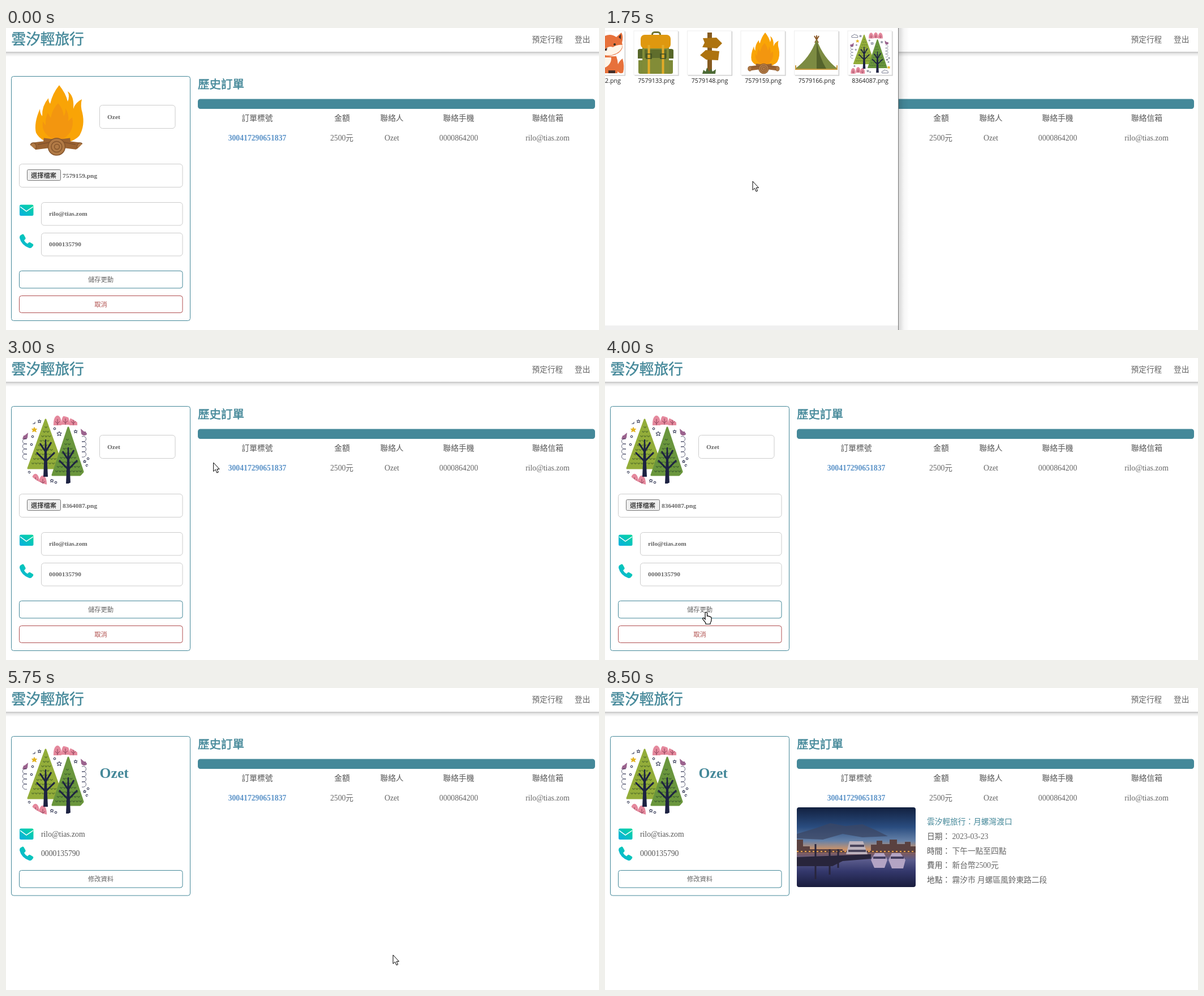
Animation of 1048 by 534 pixels, one loop 9500 ms. Source, as an HTML page:

```html
<!DOCTYPE html>
<html lang="zh-Hant">
<head>
<meta charset="utf-8">
<style>
html, body { margin: 0; width: 100%; height: 100%; overflow: hidden; background: #fff; }
svg { display: block; }
text { font: 13.7px "Liberation Serif", "Noto Sans CJK TC", "Noto Sans CJK JP", serif; fill: #666; }
.mid { text-anchor: middle; }
.teal { fill: #448899; }
.head { stroke: #448899; stroke-width: .5; }
.med { font-weight: 500; }
.dark { fill: #555; }
.input { font-size: 11.4px; font-weight: bold; }
.btn { font-size: 11.3px; text-anchor: middle; }
.file { font: 10.7px "Open Sans", "Noto Sans", sans-serif; fill: #222; text-anchor: middle; }
.box { fill: #fff; stroke: #ccc; }
.frame { fill: #fff; stroke: #448899; }
#link { font-weight: bold; fill: #5b93c8; }
#link.hover { fill: #9fcade; }
</style>
</head>
<body>
<svg width="1048" height="534" viewBox="0 0 1048 534">
<defs>
  <linearGradient id="headShade" x2="0" y2="1"><stop stop-color="#000" stop-opacity=".24"/><stop offset=".4" stop-color="#000" stop-opacity=".09"/><stop offset="1" stop-color="#000" stop-opacity="0"/></linearGradient>
  <linearGradient id="sideShade"><stop stop-color="#000" stop-opacity=".16"/><stop offset=".5" stop-color="#000" stop-opacity=".04"/><stop offset="1" stop-color="#000" stop-opacity="0"/></linearGradient>
  <linearGradient id="mint" x1="0" y1="1" x2="1" y2="0"><stop stop-color="#06aee2"/><stop offset="1" stop-color="#08d79c"/></linearGradient>
  <linearGradient id="dusk" x2="0" y2="1">
    <stop stop-color="#12203f"/><stop offset=".25" stop-color="#2a4d80"/><stop offset=".42" stop-color="#6581a8"/>
    <stop offset=".53" stop-color="#cf9468"/><stop offset=".58" stop-color="#7a5a62"/><stop offset=".66" stop-color="#5a5b8c"/><stop offset=".8" stop-color="#34386c"/><stop offset="1" stop-color="#191c3d"/>
  </linearGradient>
  <clipPath id="round"><circle cx="88" cy="163.5" r="62.5"/></clipPath>
  <clipPath id="photoClip"><rect x="339" y="211" width="210" height="141" rx="4"/></clipPath>
  <g id="fire">
    <path fill="#f9a406" d="M94 101Q106 116 109 130Q113 121 109 112Q121 120 119 143Q122 132 134 126Q131 138 135 150Q140 172 130 190Q120 202 95 204Q62 204 53 185Q49 168 60 143Q60 151 64 156Q63 138 75 124Q75 130 78 134Q82 116 94 101Z"/>
    <path fill="#f3960f" d="M92 133Q101 143 102 156Q106 150 105 142Q112 152 110 165Q114 160 117 158Q123 188 92 200Q61 190 65 165Q68 170 70 172Q69 160 74 150Q77 156 79 159Q82 143 92 133Z"/>
    <path stroke="#9b6332" stroke-width="13" d="M49 209L114 201M130 209L66 201"/>
    <path stroke="#80502a" stroke-width="1.500" d="M56 206L78 202M123 206L102 202"/>
    <g fill="#b17a45" stroke="#85552c" stroke-width="1.500">
      <ellipse cx="48" cy="210" rx="5.500" ry="7"/><ellipse cx="131" cy="210" rx="5.500" ry="7"/>
      <circle cx="89.500" cy="210" r="15"/><circle cx="89.500" cy="210" r="9.500"/><circle cx="90" cy="210" r="4.500"/>
    </g>
  </g>
  <g id="trees"></g>
  <g id="mail">
    <rect x="24" y="312.500" width="24.500" height="19.500" rx="2.500" fill="url(#mint)"/>
    <path d="M25 316L36 324L48 316" fill="none" stroke="#fff" stroke-width="1.500"/>
  </g>
  <path id="phone" fill="url(#mint)" d="M25 367L29 364.500Q30.500 364 31.500 365.500L34.500 371Q35 372.500 34 373.500L32 375.500Q34 379.500 38 381.500L40 379.500Q41 378.500 42.500 379L47.500 382Q49 383 48 385L45.500 388Q44 389.500 41 389Q27 384 24 371Q24 368.500 25 367Z"/>
</defs>

<!-- page -->
<rect width="1048" height="534" fill="#fff"/>
<rect y="42" width="1048" height="9" fill="url(#headShade)"/>
<text x="9.500" y="28.800" class="teal head" style="font-size:25.7px">雲汐輕旅行</text>
<text x="929.500" y="24.800">預定行程</text><text x="1005" y="24.800">登出</text>
<text x="339" y="106.800" class="teal head" style="font-size:20.5px">歷史訂單</text>
<rect x="339" y="125.500" width="702" height="17.500" rx="4.500" fill="#448899"/>
<g class="mid">
  <g class="med">
    <text class="dark" x="444" y="164">訂單標號</text><text class="dark" x="594" y="164">金額</text><text class="dark" x="682" y="164">聯絡人</text>
    <text class="dark" x="800" y="164">聯絡手機</text><text class="dark" x="957.500" y="164">聯絡信箱</text>
  </g>
  <text id="link" x="444" y="199">300417290651837</text><text x="593.500" y="199">2500元</text><text x="682" y="199">Ozet</text>
  <text x="800" y="199">0000864200</text><text x="957" y="199">rilo@tias.zom</text>
</g>

<rect id="panel" class="frame" x="9.500" y="85.500" width="316" rx="4"/>
<g clip-path="url(#round)"><use id="avatar"/></g>
<g id="edit">
  <rect class="box" x="165.500" y="136.500" width="133.500" height="41" rx="5"/><text class="input" x="179" y="161">Ozet</text>
  <rect class="box" x="23.500" y="240.500" width="288.500" height="41" rx="5"/>
  <rect x="37.500" y="250.500" width="59" height="19" rx="2" fill="#efefef" stroke="#767676"/>
  <text class="btn" x="66.500" y="264.500" style="fill:#000">選擇檔案</text><text id="fileName" class="input" x="100" y="265"></text>
  <use href="#mail"/><rect class="box" x="62.500" y="308.500" width="249.500" height="40.500" rx="5"/><text class="input" x="76" y="332">rilo@tias.zom</text>
  <use href="#phone"/><rect class="box" x="62.500" y="362.500" width="249.500" height="40.500" rx="5"/><text class="input" x="76" y="386">0000135790</text>
  <rect class="frame" x="23.500" y="429.500" width="288.500" height="30.500" rx="4"/><text class="btn" x="167.500" y="449.300">儲存更動</text>
  <rect class="frame" x="23.500" y="473.500" width="288.500" height="30" rx="4" style="stroke:#b04e50"/><text class="btn" x="167.500" y="493" style="fill:#b0504e">取消</text>
</g>
<g id="view">
  <text class="teal" x="165.500" y="159.300" style="font-size:25.7px;font-weight:bold">Ozet</text>
  <use href="#mail" y="-64"/><text class="dark" x="62" y="262.500">rilo@tias.zom</text>
  <use href="#phone" y="-84"/><text class="dark" x="62" y="297">0000135790</text>
  <rect class="frame" x="23.500" y="322.500" width="288.500" height="30.500" rx="4"/><text class="btn" x="167.500" y="342.300">修改資料</text>
</g>
<g id="order">
  <g clip-path="url(#photoClip)">
    <rect x="339" y="211" width="210" height="141" fill="url(#dusk)"/>
    <path fill="#3b4663" opacity=".75" d="M339 258L372 248L398 239L425 244L455 241L480 252L500 262L455 264L420 258L385 268L339 266Z"/>
    <path fill="#5a4140" d="M339 291V268H350V280H362V285H420V288H470V277H480V270H490V276H503V268H516V276H530V272H540V280H549V291Z"/>
    <path stroke="#f0a64c" stroke-width="2" stroke-dasharray="3 4" d="M339 289H549"/>
    <path fill="#28253b" d="M339 299L470 294V302L420 306L402 315H339Z"/>
    <path stroke="#28253b" stroke-width="3" d="M372 276V338M397 285V330M412 285V318"/>
    <path fill="#bdb3bd" d="M426 294L432 271H456L464 294Z"/><path stroke="#4b465c" stroke-width="4" d="M433 279H458M430 288H461"/>
    <path fill="#b3a4c4" d="M470 304L477 292H493L499 304L494 318H476ZM501 304L507 292H522L531 304L527 319H507Z"/>
    <path stroke="#433e60" stroke-width="4" d="M474 300H496M505 300H528"/>
  </g>
  <text class="teal med" x="569" y="241">雲汐輕旅行：月螺灣渡口</text>
  <g id="facts"></g>
</g>

<!-- file picker -->
<g id="dialog">
  <rect x="519" y="-20" width="18" height="640" fill="url(#sideShade)"/>
  <rect x="-60" y="-20" width="578" height="640" fill="#fff"/>
  <rect x="-60" y="526" width="578" height="94" fill="#f0f0f0"/>
  <path d="M518.500 -20V620" stroke="#777"/>
  <rect x="-20" y="534.500" width="352" height="24" fill="#fff" stroke="#4a90b8"/><rect x="342" y="534.500" width="161" height="24" fill="#e4e4e4" stroke="#aaa"/>
  <g id="tiles"></g>
  <g id="fox">
    <path fill="#e7713b" d="M0 14Q10 9 20 16L29 8Q33 15 30 26Q34 36 24 44Q14 50 0 50ZM0 50H20Q25 64 22 80H0ZM22 76Q20 62 31 54Q35 68 32 79Q26 82 22 76Z"/>
    <path fill="#fff5e8" d="M0 37Q8 31 14 34Q22 29 31 30Q30 40 20 45Q10 50 0 48ZM0 52H11Q12 64 0 70Z"/>
    <path fill="#47302a" d="M24 16L28 11L28 20ZM0 37L4 35L3 40H0ZM6 75H18V80H6Z"/><circle cx="17" cy="29" r="2" fill="#332"/>
  </g>
  <g id="backpack">
    <rect x="83.500" y="7.500" width="14" height="12" rx="4" fill="none" stroke="#6d7434" stroke-width="3"/>
    <path fill="#566629" d="M58 40Q58 37 62 37H117Q121 37 121 40V54H58Z"/><path fill="#7d8a38" d="M59 57H120V78Q120 81 117 81H62Q59 81 59 78Z"/>
    <rect x="66" y="30" width="47" height="51" rx="4" fill="#828c37"/><rect x="63" y="12" width="53" height="24" rx="7" fill="#df980f"/>
    <path fill="#5f6d2c" d="M70 38H109V53H70Z"/>
    <path stroke="#e3ab28" stroke-width="4" d="M77.500 30V81M102.500 30V81"/>
    <path fill="none" stroke="#3f4d22" stroke-width="1.500" d="M73 46H82V54H73ZM98 46H107V54H98Z"/>
  </g>
  <g id="signpost">
    <path fill="#855b20" d="M181 8H189V80H181Z"/><path fill="#ad730f" d="M173 18L197 17L207 27L198 36L172 34L176 26ZM202 41L200 57L179 56L168 48L178 39Z"/>
    <path fill="#4c6a35" d="M172 81L174 74L178 77L180 70L184 77L188 72L190 77L196 73L195 81Z"/>
  </g>
  <g id="tent">
    <path stroke="#8c5a2a" stroke-width="2" d="M370 14L377 26M378 14L371 26M374 13V25"/>
    <path fill="#7c8b42" d="M374 20Q362 53 336 72H411Q386 53 374 20Z"/><path fill="#55632c" d="M374 24V72H391Q379 52 374 24Z"/>
    <path stroke="#c99b3e" stroke-width="2" d="M336 73H411M337 66V74M410 66V74"/>
  </g>
  <use href="#fire" transform="translate(227.800 -51.500) scale(.588)"/>
  <use href="#trees" transform="translate(416.800 -51.500) scale(.588)"/>
  <rect id="picked" x="424.500" y="2.500" width="88" height="98" fill="#99d1ff" fill-opacity=".45" stroke="#85c5f5"/>
</g>
<path id="arrow" fill="#fff" stroke="#000" d="M0 0V15.500L3.600 12.200L6 18L8.600 17L6.200 11.400H10.500Z"/>
<path id="hand" fill="#fff" stroke="#000" stroke-width="1.200" d="M-1.500 2.500Q-1.500 .5 .3 .5T2.100 2.500V7.500Q4.500 6.600 5 8Q7 7.300 7.700 8.900Q9.500 8.600 9.500 10.500V14Q9.500 17 7.500 19.500V21.500H-.5V19.500L-5.500 13Q-6.500 11 -4.900 10.600T-1.500 13Z"/>
</svg>
<script>
const $ = id => document.getElementById(id);
const show = (id, on) => $(id).style.display = on ? '' : 'none';
const ink = '#1d2242';

function tree(cx, top, half, base, color, dark) {
  const h = base - top;
  let marks = '';
  for (let y = top + 12; y < base - 2; y += 8) {
    const w = half * (y - top) / h - 3;
    for (let x = cx - w; x < cx + w - 2; x += 6) marks += `M${x} ${y}q2 5 4 0`;
  }
  return `<path fill="${color}" stroke="${color}" stroke-width="3" stroke-linejoin="round" d="M${cx} ${top}L${cx + half} ${base}H${cx - half}Z"/>
    <path fill="none" stroke="${dark}" stroke-width="1.2" d="${marks}"/>
    <path fill="${ink}" d="M${cx - 1} ${top + 35}H${cx + 1}L${cx + 4} ${base + 15}H${cx - 4}Z"/>
    <path fill="none" stroke="${ink}" stroke-width="3" d="M${cx - 10} ${top + 42}L${cx} ${top + 57}L${cx + 10} ${top + 40}M${cx - 16} ${top + 58}L${cx} ${top + 74}L${cx + 16} ${top + 58}"/>`;
}
const bush = (x, y) => `<path fill="#e5899d" d="M${x - 7} ${y + 8}C${x - 8} ${y - 15} ${x + 8} ${y - 15} ${x + 7} ${y + 8}Z"/>
  <path fill="none" stroke="#8c4059" d="M${x} ${y - 3}V${y + 8}M${x - 4} ${y + 1}L${x} ${y + 5}L${x + 4} ${y + 1}"/>`;
const bird = (x, y, s) => `<path fill="#9b638e" transform="translate(${x} ${y}) scale(${s} 1)" d="M-6 -1L0 -1L6 -6L5 3Q2 8 -4 5L-6 2L-3 1Z"/>`;
const star = (x, y, r, fill) => `<path fill="${fill}" stroke="${fill === 'none' ? ink : fill}" d="M${x} ${y - r}l${r / 3} ${r * .65}h${r * .7}l${-r * .5} ${r * .5}l${r * .2} ${r * .7}L${x} ${y + r * .45}l${-r * .7} ${r * .4}l${r * .2} ${-r * .7}l${-r * .5} ${-r * .5}h${r * .7}Z"/>`;
const coil = (x, y, d) => `<path fill="none" stroke="${ink}" stroke-width=".7" d="M${x} ${y}${`c${-10 * d}-3 ${-10 * d} 11 0 9`.repeat(4)}"/>`;
const cloud = (x, y) => `<path fill="none" stroke="${ink}" d="M${x - 9} ${y + 4}q-3-6 4-6q3-6 8-1q7-1 6 7Z"/>`;

$('trees').innerHTML =
  [[91, 111], [105, 110], [119, 111], [37, 217], [52, 214], [65, 217]].map(p => bush(...p)).join('') +
  tree(70, 109, 31, 195, '#93ad3a', '#4f6b2a') + tree(110, 123, 28, 207, '#6a963d', '#3a5c2e') +
  bird(33, 138, 1) + bird(138, 131, -1) + star(50, 127, 4.5, '#e3b320') + star(144, 206, 4, '#e3b320') +
  [[94, 134, 4], [123, 130, 3], [59, 112, 3], [81, 217, 3], [139, 183, 2.5]].map(p => star(...p, 'none')).join('') +
  coil(37, 143, 1) + coil(134, 139, -1) + cloud(42, 112) + cloud(133, 219) +
  [[86, 125], [45, 153], [145, 178], [41, 202], [143, 190], [47, 139], [88, 220]]
    .map(([x, y]) => `<circle cx="${x}" cy="${y}" r="1.8" fill="none" stroke="${ink}"/>`).join('');

$('tiles').innerHTML = ['2', '7579133', '7579148', '7579159', '7579166', '8364087'].map((name, i) => {
  const x = -43.5 + i * 94.5;
  return `<rect x="${x + 1.5}" y="6" width="78" height="78.5" fill="#c4c4c4"/><rect x="${x}" y="5" width="78" height="78" fill="#fff" stroke="#eee"/>
    <text class="file" x="${i ? x + 39.5 : 14}" y="96.5">${name}.png</text>`;
}).join('');

$('facts').innerHTML = [['日期', '2023-03-23'], ['時間', '下午一點至四點'], ['費用', '新台幣2500元'], ['地點', '霧汐市 月螺區風鈴東路二段']]
  .map(([k, v], i) => {
    const y = 266.8 + i * 25.7;
    return `<text class="dark med" x="569" y="${y}">${k}：</text><text x="613.5" y="${y}">${v}</text>`;
  }).join('');

// pointer path: time, x, y
const path = [
  [250, 300, 488], [500, 180, 415], [750, 5, 330], [1000, 40, 270], [1250, 66, 256], [1500, 66, 256],
  [1750, 261, 271], [2250, 459, 60], [2500, 459, 60], [2750, 450, 75], [3500, 200, 405], [3750, 158, 441],
  [4000, 178.5, 449], [5000, 178.5, 449], [5250, 340, 500], [5500, 702, 505], [5750, 684, 472], [6000, 682, 471],
  [6250, 577, 293], [6500, 577, 293], [7250, 477.5, 196], [7500, 477.5, 196], [7750, 523, 194], [8000, 700, 340], [8250, 975, 516]
];
function pointer(t) {
  const i = path.findIndex(p => p[0] >= t);
  if (i < 0 || t < path[0][0]) return null;
  const b = path[i], a = path[Math.max(0, i - 1)];
  const f = b === a ? 0 : (t - a[0]) / (b[0] - a[0]);
  return [a[1] + (b[1] - a[1]) * f, a[2] + (b[2] - a[2]) * f];
}

function draw(now) {
  const t = Math.floor(now % 9500 / 250) * 250; // the picture ticks four times a second
  const editing = t < 5000, chosen = t >= 2750;
  show('edit', editing);
  show('view', !editing);
  show('order', t >= 7500);
  $('panel').setAttribute('height', editing ? 432 : 281.5);
  $('avatar').setAttribute('href', chosen ? '#trees' : '#fire');
  $('fileName').textContent = chosen ? '8364087.png' : '7579159.png';

  const fading = t === 1500 || t === 2500;
  show('dialog', t >= 1500 && !chosen);
  show('picked', t >= 2250);
  $('dialog').setAttribute('opacity', fading ? .75 : 1);
  $('dialog').setAttribute('transform', fading ? 'translate(90 237) scale(.99) translate(-90 -237)' : '');

  const p = pointer(t);
  const within = (l, u, r, d) => p && p[0] > l && p[0] < r && p[1] > u && p[1] < d;
  const onLink = t >= 7000 && within(392, 187, 496, 204);
  const onButton = editing && (within(23, 429, 312, 460) || within(23, 473, 312, 504));
  const hand = onLink || onButton;
  $('link').classList.toggle('hover', !!onLink);
  show('arrow', p && !hand);
  show('hand', p && hand);
  if (p) $(hand ? 'hand' : 'arrow').setAttribute('transform', `translate(${p})`);
  requestAnimationFrame(() => draw(performance.now()));
}
draw(performance.now());
</script>
</body>
</html>
```
